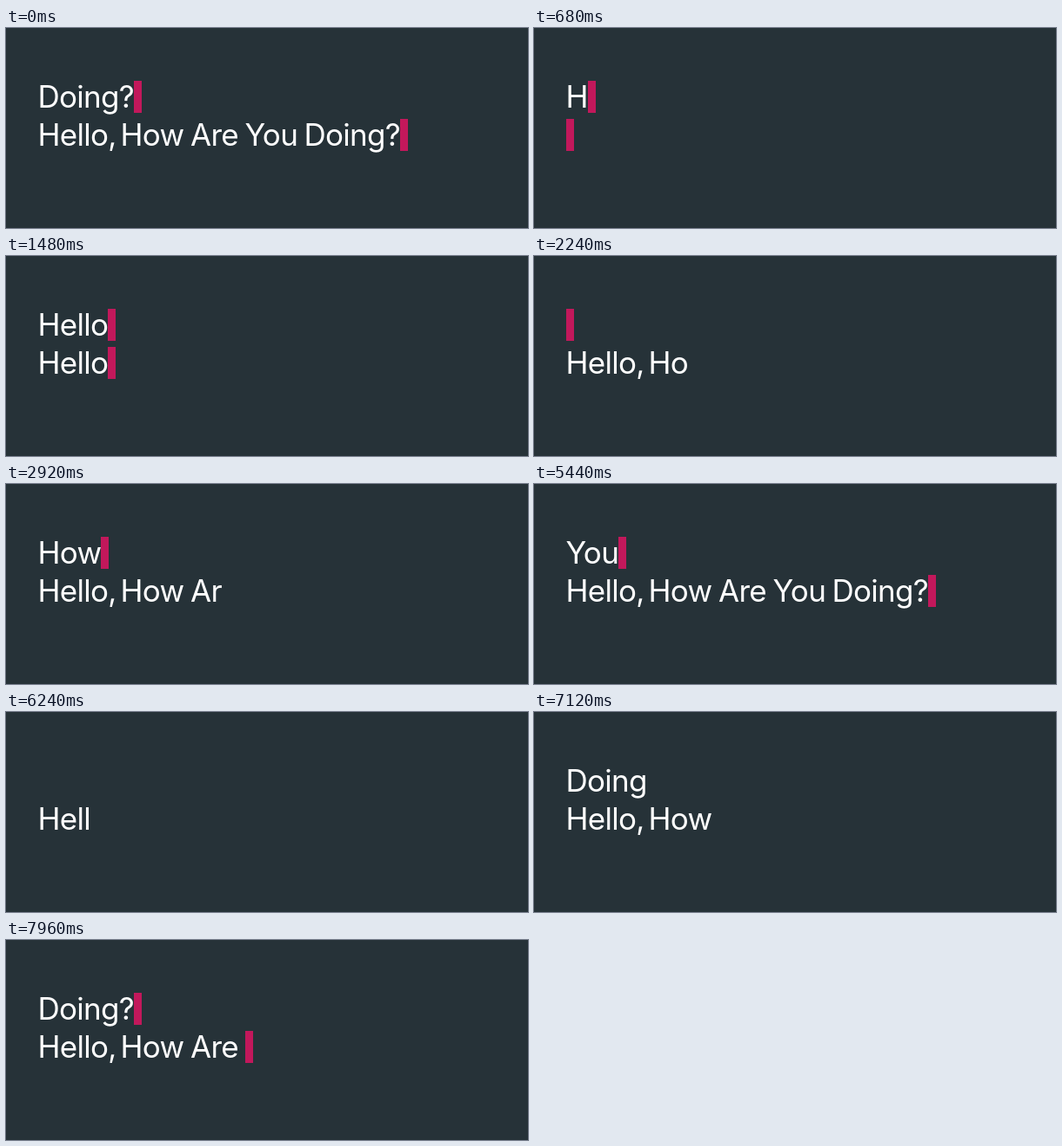
Write an HTML page that moves like this. It is 600x231 px and loops after 8000 ms.

```html
<!DOCTYPE html>
<html lang="en">
<head>
<meta charset="utf-8">
<title>Typewriter</title>
<style>
  html, body { margin: 0; width: 100%; height: 100%; overflow: hidden; background: #263238; }
  .line {
    position: absolute; left: 0; height: 44px;
    font: 400 35px/44px Inter, "Open Sans", sans-serif;
    font-optical-sizing: none; font-variation-settings: "opsz" 14;
    letter-spacing: -0.02em; white-space: pre; color: #fff;
  }
  .word { position: absolute; top: 0; height: 44px; }
  .cursor { position: absolute; top: 4px; width: 9px; height: 37px; background: #c2185b; }
  #single { top: 57px; }
  #full { top: 101px; }
</style>
</head>
<body>
<div class="line" id="single"></div>
<div class="line" id="full"></div>
<script>
  const LOOP = 8000;
  const TICK = 500 / 3;      // one typed letter
  const LEFT = 36.5;

  // Each word of the sentence with its left edge.
  const sentence = [["Hello, ", LEFT], ["How ", 131.5], ["Are ", 212], ["You ", 274.5], ["Doing?", 342.5]];
  const sentenceStarts = [-4250, 600, 5450];

  // Single words with the time their typing starts.
  const singles = [["Doing?", -1400], ["Hello", 432], ["How", 2115], ["Are", 3465], ["You", 4815], ["Doing?", 6165]];

  const blinkSingle = { first: 270, half: 331.5 };
  const blinkFull = { first: 240, half: 1000 / 3 };

  const makeWord = (line, x) => {
    const word = document.createElement("span");
    const text = document.createTextNode("");
    const cursor = document.createElement("span");
    word.className = "word";
    word.style.left = x + "px";
    cursor.className = "cursor";
    word.append(text, cursor);
    document.getElementById(line).append(word);
    return { text, cursor };
  };

  const singleWord = makeWord("single", LEFT);
  const fullWords = sentence.map(([, x]) => makeWord("full", x));

  const cursorOn = (t, { first, half }) => Math.floor((t - first) / half) % 2 !== 0;
  const typed = (t, start) => Math.floor((t - start) / TICK);

  function show(word, text, on) {
    if (word.text.data !== text) word.text.data = text;
    word.cursor.style.visibility = on ? "visible" : "hidden";
  }

  function drawSingle(t) {
    const [text, start] = singles.findLast(([, s]) => s <= t);
    show(singleWord, text.slice(0, typed(t, start)), cursorOn(t, blinkSingle));
  }

  function drawFull(t) {
    let left = typed(t, sentenceStarts.findLast(s => s <= t));
    const on = cursorOn(t, blinkFull);
    sentence.forEach(([text], i) => {
      const last = i === sentence.length - 1;
      const active = left >= 0 && (left < text.length || last);
      show(fullWords[i], text.slice(0, Math.max(0, left)), active && on);
      left -= text.length;
    });
  }

  const begin = performance.now();
  function frame() {
    const t = (performance.now() - begin) % LOOP;
    drawSingle(t);
    drawFull(t);
    requestAnimationFrame(frame);
  }
  frame();
</script>
</body>
</html>
```
